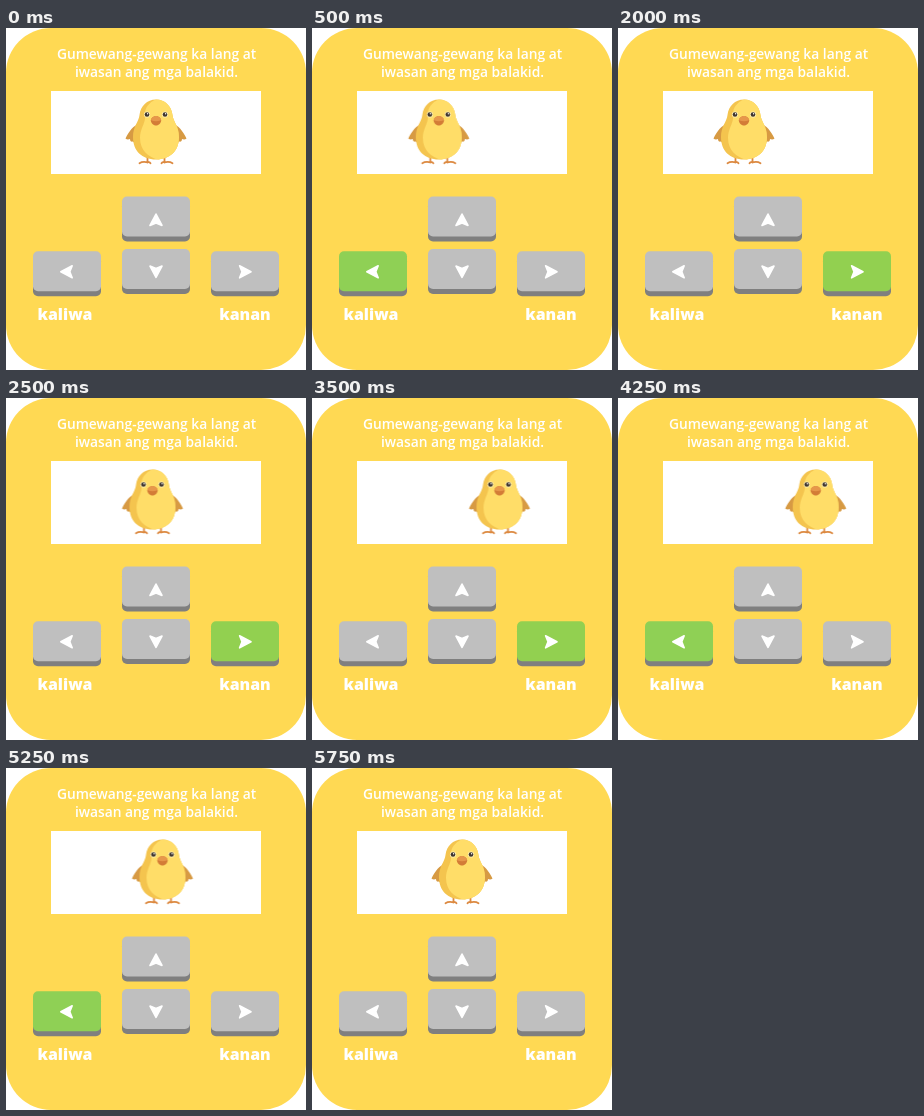
Write an HTML page that moves like this. It is 300 by 342 pixels and loops after 6000 ms.

```html
<!DOCTYPE html>
<html lang="fil">
<head>
<meta charset="utf-8">
<title>Kaliwa, kanan</title>
<style>
  html, body { margin: 0; width: 100%; height: 100%; overflow: hidden; background: #fff; }
  svg { display: block; width: 100vw; height: 100vh; }
  text { fill: #fff; text-anchor: middle; font-family: "Open Sans", "Noto Sans", sans-serif; }
  .title { font-size: 13.8px; font-weight: 600; }
  .label { font-size: 15.9px; font-weight: 800; }
  .key { fill: #bfbfbf; }
  .arrow { fill: #fff; stroke: #fff; stroke-width: 1.6; stroke-linejoin: round; }

  #chick { animation: walk 6s infinite; }
  #left .key { animation: press-left 6s step-end infinite; }
  #right .key { animation: press-right 6s step-end infinite; }

  /* The walk advances once every 250 ms. */
  @keyframes walk {
    0% { transform: translateX(0); animation-timing-function: steps(5); }
    20.8333% { transform: translateX(-58px); animation-timing-function: steps(3); }
    33.3333% { transform: translateX(-24px); animation-timing-function: steps(8); }
    66.6666% { transform: translateX(58px); animation-timing-function: steps(5); }
    87.5% { transform: translateX(6.5px); animation-timing-function: step-end; }
    91.6666%, 100% { transform: translateX(0); }
  }
  @keyframes press-left {
    0%, 25%, 95.8333%, 100% { fill: #bfbfbf; }
    4.1666%, 70.8333% { fill: #8fd055; }
  }
  @keyframes press-right {
    0%, 70.8333%, 100% { fill: #bfbfbf; }
    25% { fill: #92d050; }
  }
</style>
</head>
<body>
<svg viewBox="0 0 300 342" preserveAspectRatio="none">
  <defs>
    <path id="body-shape" d="M150 71.5C141 71.5 134.5 78 133.5 87C132.8 94 127 98 127 109C127 123 136 131.5 150 131.5S173 123 173 109C173 98 167.2 94 166.5 87C165.5 78 159 71.5 150 71.5Z"/>
    <clipPath id="body-clip"><use href="#body-shape"/></clipPath>
    <path id="wing" d="M133 96C128 97 123 103 119.5 110.5C121 112 123 111.5 124 111C124 113 125 114 127 113.5C128 115 130 115.5 132 114Z"/>
    <g id="leg" fill="none" stroke="#dc8940" stroke-width="1.8" stroke-linecap="round" stroke-linejoin="round">
      <path d="M0 129V134.5M-8 135.2Q-5 133.2 0 134.3Q2 133.8 3 135.2"/>
    </g>
    <g id="eye">
      <circle r="3.1" fill="#fff0b0"/>
      <circle r="2.3" fill="#3f3530"/>
      <circle cx=".6" cy="-.8" r=".7" fill="#fff"/>
    </g>
    <path id="arrow" class="arrow" d="M0-6L6 5.4L0 3L-6 5.4Z"/>
    <g id="base">
      <rect y="5" width="68" height="40" rx="5" fill="#7f7f7f"/>
    </g>
  </defs>

  <rect width="300" height="342" rx="45" fill="#ffd953"/>
  <text class="title" x="150.5" y="30.5">Gumewang-gewang ka lang at</text>
  <text class="title" x="150.5" y="48.5">iwasan ang mga balakid.</text>
  <rect x="45" y="63" width="210" height="83" fill="#fff"/>

  <g id="chick">
    <use href="#leg" x="141.5"/>
    <use href="#leg" transform="translate(158.5 0) scale(-1 1)"/>
    <use href="#wing" fill="#d79a43"/>
    <use href="#wing" fill="#d79a43" transform="translate(300 0) scale(-1 1)"/>
    <use href="#body-shape" fill="#f4c44e"/>
    <g clip-path="url(#body-clip)">
      <path d="M153 70C142 74 138 81 139 89C139.5 95 134 101 134 110C134 122 142 129 153 132H176V70Z" fill="#ffdd68"/>
    </g>
    <use href="#eye" x="141" y="86.5"/>
    <use href="#eye" x="159" y="86.5"/>
    <path d="M150 88C153 88 155.2 90.5 155.2 92.5C155 95.5 152 97.5 150 97.5S145 95.5 144.8 92.5C144.8 90.5 147 88 150 88Z" fill="#d37c36"/>
    <path d="M150 88C153 88 155.2 90.5 155 92.3Q150 94.2 145 92.3C144.8 90.5 147 88 150 88Z" fill="#e6974a"/>
  </g>

  <g transform="translate(116 168.5)">
    <use href="#base"/>
    <rect class="key" width="68" height="40" rx="5"/>
    <use href="#arrow" x="34" y="23.5"/>
  </g>
  <g transform="translate(116 221)">
    <use href="#base"/>
    <rect class="key" width="68" height="40" rx="5"/>
    <use href="#arrow" transform="translate(34 22.5) rotate(180)"/>
  </g>
  <g id="left" transform="translate(27 223.3)">
    <use href="#base"/>
    <rect class="key" width="68" height="40" rx="5"/>
    <use href="#arrow" transform="translate(33.8 20.5) rotate(-90)"/>
  </g>
  <g id="right" transform="translate(205 223.3)">
    <use href="#base"/>
    <rect class="key" width="68" height="40" rx="5"/>
    <use href="#arrow" transform="translate(34 20.5) rotate(90)"/>
  </g>
  <text class="label" x="59" y="292">kaliwa</text>
  <text class="label" x="239" y="292">kanan</text>
</svg>
</body>
</html>
```
